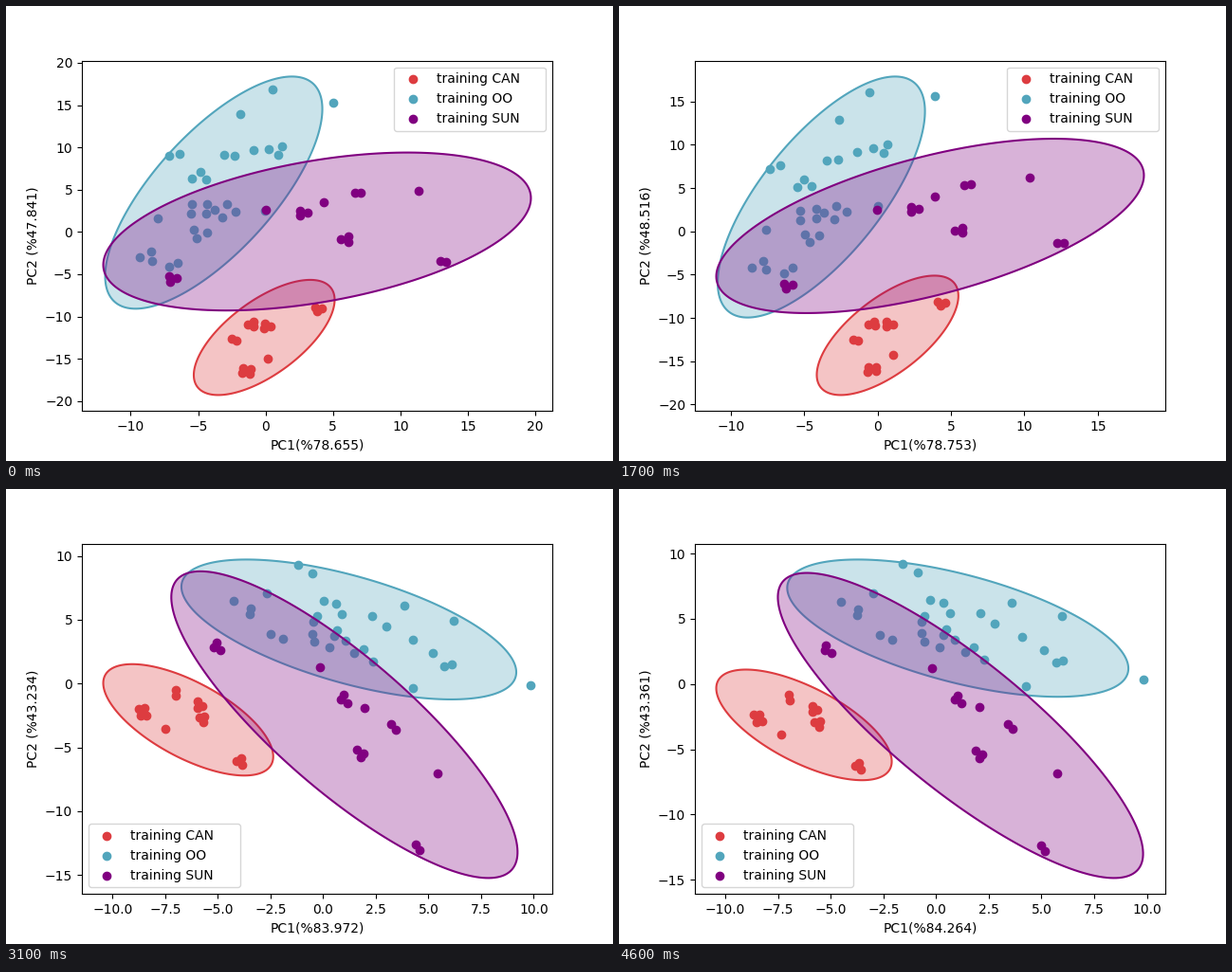
These frames come from a looping animation (640x480 px, 4700 ms). A matplotlib script:

```python
import numpy as np
import matplotlib.pyplot as plt
from matplotlib.animation import FuncAnimation
from matplotlib.colors import to_rgba

FRAMES, STEP = 47, 100
FLIP = 29          # the components swap here
DRIFT = 0.003      # slow turn per step after the flip, in radians
CHI95 = 2.4477     # 95 % radius for two degrees of freedom

# Each class: name, colour, spread, clumps of samples as (x, y, count)
CLASSES = [
    ("CAN", "#dd3c40", 0.1, [
        (-2.3, -12.7, 2), (-1, -10.9, 3), (0.1, -11.1, 3), (0.2, -14.9, 1),
        (-1.4, -16.4, 4), (3.9, -9.1, 3)]),
    ("OO", "#52a5bc", 0.2, [
        (0.5, 16.9, 1), (-1.9, 14, 1), (5, 15.3, 1), (-6.8, 9.2, 2),
        (-4.9, 6.6, 3), (-2.7, 9.1, 2), (-0.9, 9.7, 1), (0.8, 9.7, 3),
        (-8, 1.6, 1), (-4.9, 2.7, 4), (-3, 2.5, 4), (0, 2.5, 1),
        (-8.7, -2.9, 3), (-6.8, -3.9, 2), (-4.9, -0.2, 3)]),
    ("SUN", "purple", 0.12, [
        (0.1, 2.6, 1), (2.8, 2.2, 3), (4.4, 3.5, 1), (6, -0.9, 3),
        (6.9, 4.6, 2), (11.4, 4.8, 1), (13.2, -3.5, 2), (-6.9, -5.6, 3)]),
]

# Ellipse of each class: centre x, y, half width, half height,
# correlation, and the turn of the samples inside it in degrees
START = [(-0.10, -12.48, 5.22, 6.81, 0.653, 0),
         (-3.84, 4.65, 8.05, 13.73, 0.72, 0),
         (3.82, 0.05, 15.85, 9.34, 0.423, 0)]
TURNED = [(0.80, -11.93, 4.76, 6.91, 0.663, 6),
          (-3.84, 3.86, 6.90, 13.95, 0.71, 8),
          (3.53, 0.73, 14.36, 10.19, 0.605, 8)]
STEEP = [(2.60, -8.98, 4.47, 5.56, 0.675, 12),
         (-4.18, 1.83, 5.68, 11.30, 0.645, 36),
         (3.28, 1.37, 12.32, 10.76, 0.822, 28)]
FLIPPED = [(-6.37, -2.92, 4.07, 4.33, -0.66, -81),
           (1.17, 4.25, 7.99, 5.42, -0.605, -51),
           (1.05, -3.21, 8.34, 11.93, -0.834, -55)]
POSES = np.array([START, TURNED, STEEP])

# Step, blend between the poses, share of each component
KEYS = [0, 8, 17, 24, 25, 28, 29, 35, 46]
BLEND = [0, 0.3, 0.86, 1, 1.7, 2]
PC1 = [78.655, 78.665, 78.753, 78.828, 82.2, 82.681, 83.9, 84.116, 84.264]
PC2 = [47.841, 48.026, 48.516, 48.613, 47.2, 46.823, 43.2, 43.303, 43.361]

rng = np.random.default_rng(4)


def circle(count, phase=0.0):
    t = phase + np.arange(count) * 2 * np.pi / count
    return np.column_stack([np.cos(t), np.sin(t)])


def rotation(a):
    return np.array([[np.cos(a), -np.sin(a)], [np.sin(a), np.cos(a)]])


def root(cov):
    """Symmetric square root of a covariance matrix."""
    val, vec = np.linalg.eigh(cov)
    return (vec * np.sqrt(val)) @ vec.T


def samples(clumps, spread):
    """Samples ringed around each clump, scaled to zero mean and unit spread."""
    rings = []
    for x, y, count in clumps:
        radius = spread * count if count > 1 else 0
        rings.append((x, y) + radius * circle(count, rng.uniform(0, 2 * np.pi)))
    pts = np.vstack(rings)
    return (pts - pts.mean(axis=0)) @ np.linalg.inv(root(np.cov(pts.T)))


SHAPES = [samples(clumps, spread) for _, _, spread, clumps in CLASSES]
OUTLINE = circle(200)


def poses(n):
    if n >= FLIP:
        return FLIPPED
    s = np.interp(n, KEYS[:6], BLEND)
    i = min(int(s), 1)
    return POSES[i] + (POSES[i + 1] - POSES[i]) * (s - i)


def place(shape, pose, turn):
    """Points and ellipse outline of one class."""
    x, y, w, h, rho, spin = pose
    axes = root([[w * w, rho * w * h], [rho * w * h, h * h]])
    pts = shape @ rotation(np.radians(spin)).T / CHI95
    return [((x, y) + p @ axes) @ rotation(turn).T for p in (pts, OUTLINE)]


def legend_corner(n):
    if n >= FLIP:
        return "lower left"
    return "upper right" if n <= 24 else "lower right"


fig, ax = plt.subplots(figsize=(6.4, 4.8), dpi=100)


def draw(n):
    ax.clear()
    turn = DRIFT * (n - 35) if n >= FLIP else 0
    for (name, color, *_), shape, pose in zip(CLASSES, SHAPES, poses(n)):
        pts, edge = place(shape, pose, turn)
        ax.scatter(*pts.T, color=color, label=f"training {name}" + " " * 5)
        ax.fill(*edge.T, facecolor=to_rgba(color, 0.3), edgecolor=color, lw=1.5)
    ax.set_xlabel(f"PC1(%{np.interp(n, KEYS, PC1):.3f})")
    ax.set_ylabel(f"PC2 (%{np.interp(n, KEYS, PC2):.3f})")
    ax.legend(loc=legend_corner(n))
    return []


anim = FuncAnimation(fig, draw, frames=FRAMES, interval=STEP,
                     repeat=True, repeat_delay=0)
plt.show()
```
